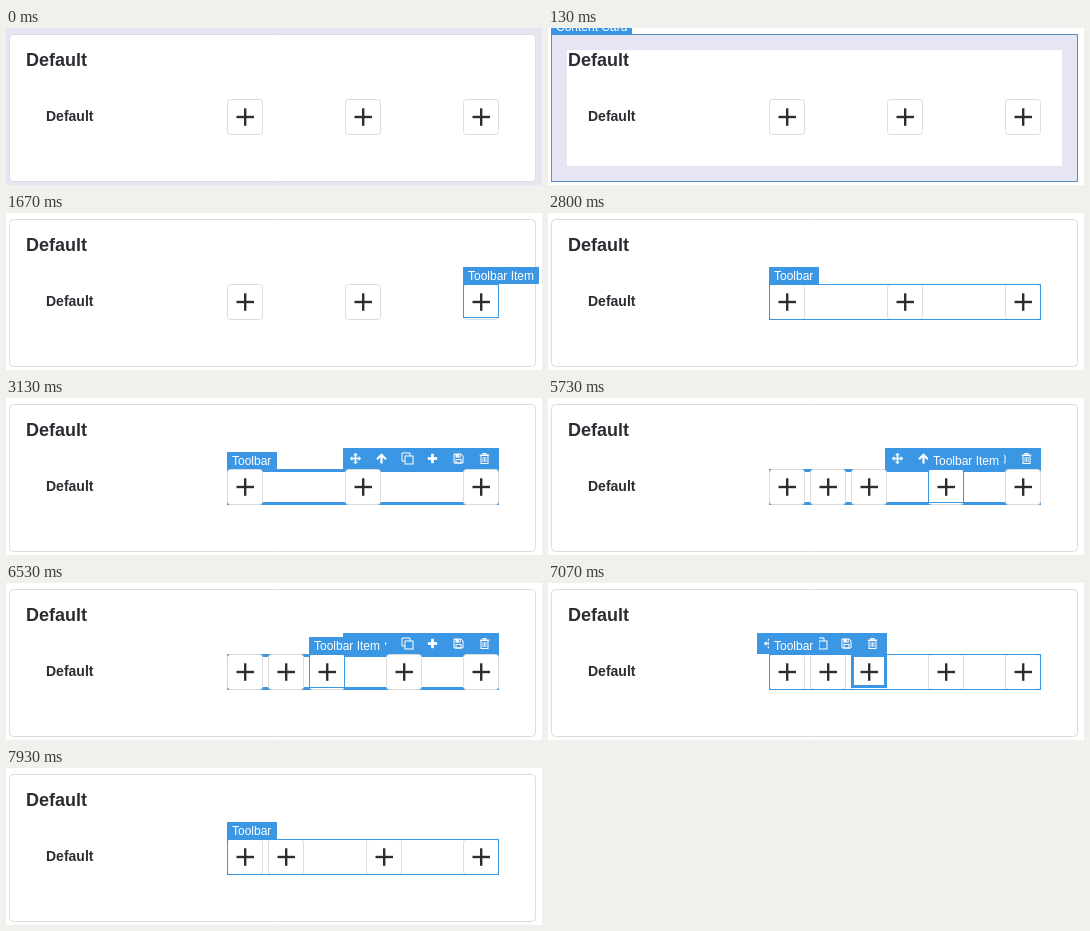
Write an HTML page with a canvas that moves like this. It is 536 px wide and 157 px high and loops after 8000 ms.

```html
<!DOCTYPE html>
<html lang="en">
<head>
<meta charset="utf-8">
<title>Toolbar editor</title>
<style>
html, body { margin: 0; width: 100%; height: 100%; overflow: hidden; background: #fff; }
canvas { display: block; }
</style>
</head>
<body>
<canvas id="stage" width="536" height="157"></canvas>
<script>
const ctx = document.getElementById('stage').getContext('2d');
const LOOP = 8000;
const BLUE = '#3b97e3', PAD = '#e6e5f4', INK = '#2a2d31', LINE = '#dcdcdc';
const FONT = '"Liberation Sans", Arial, sans-serif';
const BAR = { x: 221, y: 71, w: 272, h: 36 };
const CARD = { x: 3, y: 6, w: 527, h: 148 };

// start time, number of items, hovered part, selected part (a number is an item index)
const steps = [
  [0, 3, 'page', null],
  [130, 3, 'card', null],
  [1670, 3, 2, null],
  [2800, 3, 'bar', null],
  [3130, 3, 'bar', 'bar'],
  [3600, 3, null, 'bar'],
  [4200, 4, null, 'bar'],
  [5200, 5, null, 'bar'],
  [5730, 5, 3, 'bar'],
  [6330, 5, 'bar', 'bar'],
  [6530, 5, 2, 'bar'],
  [6870, 5, 2, 2],
  [7070, 5, 'bar', 2],
  [7270, 5, null, 2],
  [7800, 4, null, null],
  [7930, 4, 'bar', null]
];

function fill(color, x, y, w, h) {
  ctx.fillStyle = color;
  ctx.fillRect(x, y, w, h);
}

function frame(color, b, width = 1) {
  ctx.strokeStyle = color;
  ctx.lineWidth = width;
  ctx.strokeRect(b.x + width / 2, b.y + width / 2, b.w - width, b.h - width);
}

function panel(b, r) {
  ctx.beginPath();
  ctx.roundRect(b.x + .5, b.y + .5, b.w - 1, b.h - 1, r);
  ctx.fillStyle = '#fff';
  ctx.fill();
  ctx.strokeStyle = LINE;
  ctx.lineWidth = 1;
  ctx.stroke();
}

function text(str, x, y, font, color) {
  ctx.font = font + ' ' + FONT;
  ctx.fillStyle = color;
  ctx.fillText(str, x, y);
}

function poly(...p) {
  ctx.beginPath();
  for (let i = 0; i < p.length; i += 2) ctx.lineTo(p[i], p[i + 1]);
  ctx.closePath();
  ctx.fill();
}

const icons = {
  move() {
    ctx.fillRect(-4, -.8, 8, 1.6);
    ctx.fillRect(-.8, -4, 1.6, 8);
    for (let i = 0; i < 4; i++) {
      poly(0, -5.7, 2.4, -3.2, -2.4, -3.2);
      ctx.rotate(Math.PI / 2);
    }
  },
  up() {
    poly(0, -5.2, 5.2, 0, 3.8, 1.4, 1.1, -1.2, 1.1, 5, -1.1, 5, -1.1, -1.2, -3.8, 1.4, -5.2, 0);
  },
  clone() {
    ctx.strokeRect(-2.5, -2.5, 8, 8);
    ctx.beginPath();
    ctx.moveTo(-2.5, 2.5);
    ctx.lineTo(-5.5, 2.5);
    ctx.lineTo(-5.5, -5.5);
    ctx.lineTo(2.5, -5.5);
    ctx.lineTo(2.5, -2.5);
    ctx.stroke();
  },
  add() {
    ctx.fillRect(-4.7, -1.4, 9.4, 2.8);
    ctx.fillRect(-1.4, -4.7, 2.8, 9.4);
  },
  save() {
    ctx.beginPath();
    ctx.moveTo(-4.5, -4.5);
    ctx.lineTo(2.5, -4.5);
    ctx.lineTo(4.5, -2.5);
    ctx.lineTo(4.5, 4.5);
    ctx.lineTo(-4.5, 4.5);
    ctx.closePath();
    ctx.stroke();
    ctx.strokeRect(-2.5, 1, 5, 3.5);
    ctx.fillRect(-3, -4.5, 5.2, 3.6);
    fill(BLUE, .2, -4, 1, 2.3);
  },
  trash() {
    ctx.fillRect(-4.8, -3.9, 9.6, 1.1);
    ctx.strokeRect(-1.6, -5, 3.2, 1.6);
    ctx.strokeRect(-3.5, -3, 7, 8);
    for (const x of [-1.9, -.4, 1.1]) ctx.fillRect(x, -1.5, .8, 5);
  }
};

function tools(right, names) {
  const left = right - names.length * 26;
  fill(BLUE, left, 50, right - left, 21);
  names.forEach((name, i) => {
    ctx.save();
    ctx.translate(Math.round(left + 12 + i * 25.8) + .5, 60.5);
    ctx.fillStyle = ctx.strokeStyle = '#fff';
    ctx.lineWidth = 1;
    icons[name]();
    ctx.restore();
  });
}

function label(str, x, bottom, w) {
  fill(BLUE, x, bottom - 17, w, 17);
  text(str, x + 5, bottom - 4, '12px', '#fff');
}

// items pack to the left, the last two are spread over the remaining space
function itemX(i, n) {
  if (i < n - 2) return 221 + 41 * i;
  if (i === n - 1) return 457;
  return Math.round((221 + 41 * (n - 3) + 36 + 421) / 2);
}

function item(x) {
  panel({ x, y: 71, w: 36, h: 36 }, 3);
  fill(INK, x + 9.5, 87.8, 17.5, 2.4);
  fill(INK, x + 17, 80.3, 2.4, 17.5);
}

function draw(time) {
  const [, n, hover, sel] = steps.findLast(s => s[0] <= time);
  const box = i => ({ x: itemX(i, n), y: 71, w: 36, h: 34 });

  fill(hover === 'page' ? PAD : '#fff', 0, 0, 536, 157);
  panel(CARD, 4);
  if (hover === 'card') {
    fill(PAD, 4, 7, 525, 146);
    fill('#fff', 19, 22, 495, 116);
  }
  text('Default', 20, 38, 'bold 18px', INK);
  text('Default', 40, 93, 'bold 14px', INK);

  if (sel === 'bar') frame(BLUE, BAR, 3);
  for (let i = 0; i < n; i++) item(itemX(i, n));
  if (typeof sel === 'number') frame(BLUE, box(sel), 3);

  if (sel === 'bar') tools(493, ['move', 'up', 'clone', 'add', 'save', 'trash']);
  else if (sel !== null) tools(itemX(sel, n) + 36, ['move', 'up', 'clone', 'save', 'trash']);

  if (hover === 'card') {
    frame('#5590cf', CARD);
    label('Content Card', 3, 7, 81);
  } else if (hover === 'bar') {
    if (sel !== 'bar') frame(BLUE, BAR);
    label('Toolbar', 221, 71, 50);
  } else if (typeof hover === 'number') {
    if (sel !== hover) frame(BLUE, box(hover));
    label('Toolbar Item', itemX(hover, n), 71, 76);
  }
}

const start = performance.now();
function tick() {
  draw((performance.now() - start) % LOOP);
  requestAnimationFrame(tick);
}
tick();
</script>
</body>
</html>
```
